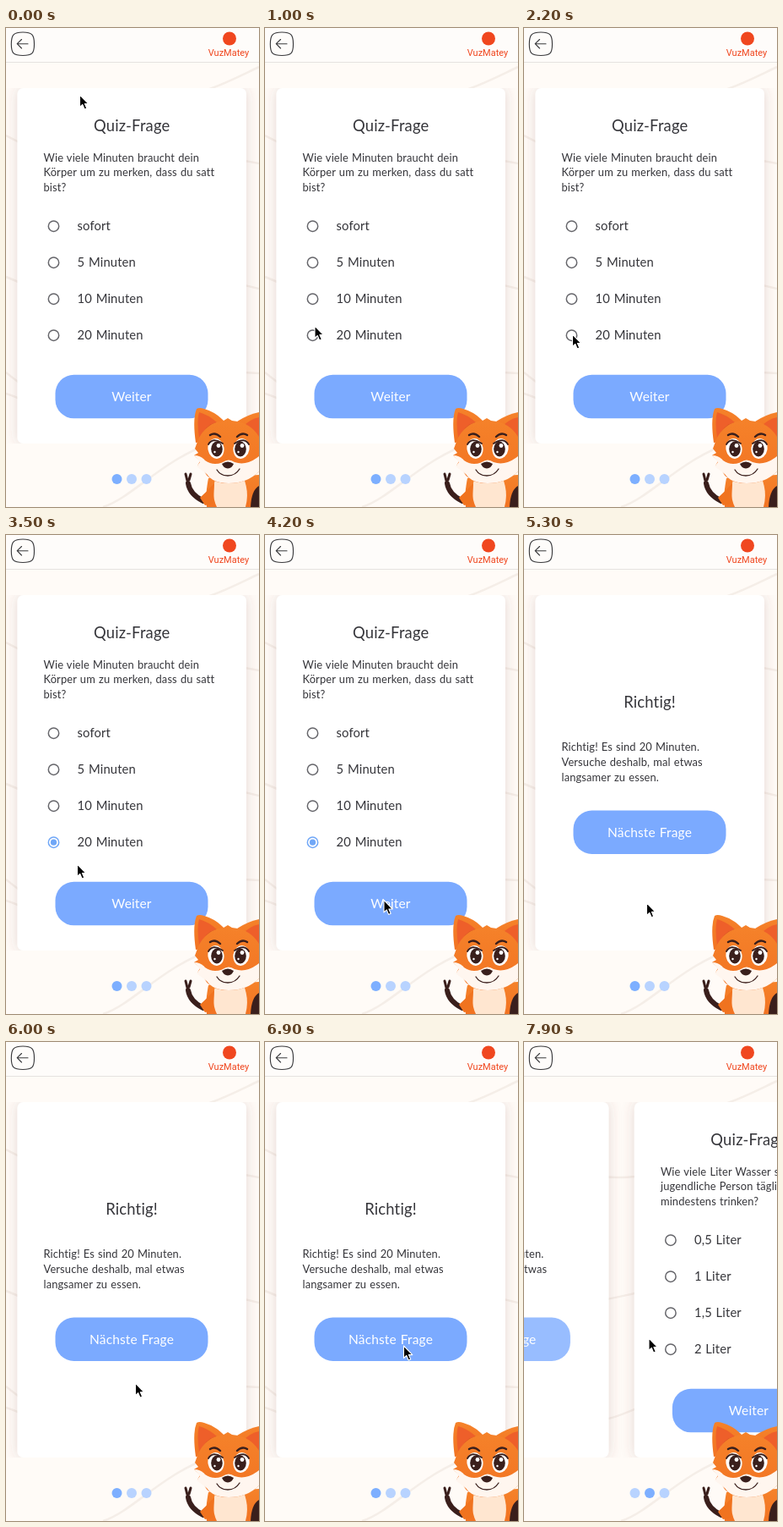
Write an HTML page that moves like this. It is 300 px wide and 566 px high and loops after 8 s.

```html
<!DOCTYPE html>
<html lang="de">
<head>
<meta charset="utf-8">
<title>Quiz</title>
<style>
  html, body { margin: 0; width: 100%; height: 100%; overflow: hidden; background: #fffbf7; }
  svg { display: block; width: 100%; height: 100%; }
  text { font-family: Nunito, Lato, sans-serif; fill: #35353a; letter-spacing: .01em; word-spacing: .05em; }
  .title { font-size: 18.4px; text-anchor: middle; }
  .body { font-size: 12.9px; }
  .option { font-size: 14.8px; }
  .label { font-size: 15.5px; text-anchor: middle; fill: #fff; }
  .brand { font: 11px Roboto, sans-serif; letter-spacing: 0; text-anchor: middle; fill: #f0471f; }
</style>
</head>
<body>
<svg viewBox="0 0 300 566">
  <defs>
    <clipPath id="deckClip"><rect y="71" width="300" height="420"/></clipPath>
    <filter id="shadow" x="-15%" y="-15%" width="130%" height="130%">
      <feDropShadow dx="0" dy="0" stdDeviation="7.5" flood-color="#7a4a48" flood-opacity=".2"/>
    </filter>
    <linearGradient id="fur" x2="0" y2="1">
      <stop stop-color="#f5822a"/><stop offset="1" stop-color="#f27322"/>
    </linearGradient>
  </defs>

  <rect width="300" height="566" fill="#fffbf7"/>
  <g fill="none" stroke="#f5eee8" stroke-width="2.5">
    <path d="M200 84C245 74 270 60 300 46"/>
    <path d="M0 127C35 145 65 160 110 160S230 145 300 160"/>
    <path d="M0 294C50 318 90 306 131 297S240 292 300 308"/>
    <path d="M0 407C35 436 65 452 100 445S180 398 300 408"/>
    <path d="M0 432C25 440 50 455 70 470"/>
    <path d="M115 566C150 555 185 510 245 490"/>
  </g>

  <rect width="300" height="40" fill="#fefcfa"/>
  <path d="M0 40.5H300" stroke="#e5e2e0"/>
  <g fill="none" stroke="#3a3a3d" stroke-width="1.15" stroke-linecap="round" stroke-linejoin="round">
    <path d="M20 5C31 5 33.500 8 33.500 19S31 32.500 20 32.500S6.300 30 6.300 19S9 5 20 5Z"/>
    <path d="M26 18.700H13.500M18.500 13.500L13.200 18.700L18.500 24"/>
  </g>
  <circle cx="265" cy="12.5" r="8" fill="#f0471f"/>
  <text class="brand" x="264" y="33">VuzMatey</text>

  <g clip-path="url(#deckClip)"><g id="deck"></g></g>
  <g id="dots"></g>

  <g id="fox">
    <path d="M240 532Q236 552 238 566H300V528Z" fill="url(#fur)"/>
    <path d="M248 533Q243 552 250 566H284Q289 548 281 530Z" fill="#ffe6d0"/>
    <path d="M216 538Q218 551 234 559" fill="none" stroke="#3a1f1c" stroke-width="6" stroke-linecap="round"/>
    <path d="M215 535L213 527M217 534L219 527" stroke="#3a1f1c" stroke-width="3" stroke-linecap="round"/>
    <path d="M230 555Q238 548 247 538L246 562L236 564Z" fill="#f0731f"/>
    <path d="M300 541Q291 546 290 566H300Z" fill="#3a1f1c"/>
    <path d="M225 490Q221 462 226 450Q229 448 235 450Q249 454 259 465L240 488Z" fill="url(#fur)"/>
    <path d="M229 484Q226 464 229 454Q240 457 250 466Z" fill="#ee5f2a"/>
    <path d="M231 484Q236 469 250 466L241 480Z" fill="#c94a20"/>
    <path d="M274 465Q286 457 300 454V490Z" fill="url(#fur)"/>
    <path d="M284 468Q291 462 300 460V484Z" fill="#ee5f2a"/>
    <path d="M228 486Q238 466 258 464L263 461L268 464Q290 466 300 483V524Q286 538 264 538Q242 538 235 524L227 517L230 512L223 505L228 502L224 497Z" fill="url(#fur)"/>
    <path d="M223 505Q231 505 236 511Q246 518 257 513Q264 508 271 513Q285 518 300 506V524Q286 538 264 538Q245 538 238 527L226 518L230 513Z" fill="#fff6ef"/>
    <g fill="#fff">
      <ellipse cx="249" cy="497" rx="9.500" ry="12" transform="rotate(-10 249 497)"/>
      <ellipse cx="279" cy="497" rx="9.500" ry="12" transform="rotate(10 279 497)"/>
    </g>
    <g fill="#3a1f1c">
      <ellipse cx="250" cy="497.500" rx="6.800" ry="9"/>
      <ellipse cx="278" cy="497.500" rx="6.800" ry="9"/>
      <path d="M256 515Q263 510 270 515Q268 520 263 520.500Q258 520 256 515Z"/>
    </g>
    <g fill="#fff">
      <circle cx="252" cy="493.500" r="2.400"/><circle cx="280" cy="493.500" r="2.400"/>
      <circle cx="247.500" cy="501" r="1.200"/><circle cx="275.500" cy="501" r="1.200"/>
    </g>
    <g fill="none" stroke="#3a1f1c" stroke-linecap="round">
      <path d="M240 492Q245 483 257 491M271 491Q283 483 288 492" stroke-width="1.800"/>
      <path d="M242 481Q248 477 254 483M274 483Q280 477 286 481" stroke-width="2.400"/>
      <path d="M250 522Q254 529 263 529Q272 529 277 521" stroke-width="1.300"/>
    </g>
  </g>

  <path id="cursor" d="M0 0V14.500L3.300 11.500L5.600 17L8.200 15.900L5.900 10.600H10.300Z"
        fill="#000" stroke="#fff" stroke-width="1.100" stroke-linejoin="round"/>
</svg>

<script>
const LOOP = 8000, STEP = 100, STRIDE = 302;
const CLICK = { option: 3000, submit: 4500, reveal: 4900, next: 7600, slide: 7700 };
const SLIDE_TIME = 348;
const BLUE = '#7baaff', PRESSED = '#98bdff', PALE = '#b8d3ff';
const cursorPath = [
  [200, 87.5, 79], [1000, 59, 352], [1300, 57.5, 362], [2900, 57.5, 362],
  [3400, 84.5, 389], [3700, 84.5, 389], [4300, 145.500, 434.8], [5600, 145.500, 434.8],
  [6500, 164.500, 359], [7500, 164.500, 359], [7900, 148, 350]
];
const byId = id => document.getElementById(id);
const smooth = u => { u = Math.min(1, Math.max(0, u)); return u * u * (3 - 2 * u); };

const line = (cls, x, y, text) => `<text class="${cls}" x="${x}" y="${y}">${text}</text>`;
const paragraph = (y, lines) => lines.map((s, i) => line('body', 44.5, y + i * 17.8, s)).join('');
const button = (id, y, label) =>
  `<rect id="${id}" x="58.5" y="${y}" width="181" height="51.5" rx="22" fill="${BLUE}"/>` +
  line('label', 149, y + 31, label);
const radio = (id, y) =>
  `<g id="${id}"><circle cx="56.5" cy="${y}" r="6.2" fill="none" stroke="#66666b" stroke-width="1.5"/></g>`;
const card = content =>
  `<rect x="13.5" y="71" width="271.5" height="420" rx="7" fill="#fff" filter="url(#shadow)"/>${content}`;

function question(id, lines, options) {
  const rows = options.map((s, i) =>
    radio(`${id}Radio${i}`, 234.2 + i * 43) + line('option', 84.5, 239.4 + i * 43, s)).join('');
  return line('title', 149.2, 122, 'Quiz-Frage') + paragraph(157.5, lines) + rows +
    button(`${id}Button`, 409.8, 'Weiter');
}

byId('deck').innerHTML =
  card(
    `<g id="ask">${question('first',
      ['Wie viele Minuten braucht dein', 'Körper um zu merken, dass du satt', 'bist?'],
      ['sofort', '5 Minuten', '10 Minuten', '20 Minuten'])}</g>` +
    `<g id="answer">${line('title', 149, 204, 'Richtig!')}` +
    paragraph(255, ['Richtig! Es sind 20 Minuten.', 'Versuche deshalb, mal etwas', 'langsamer zu essen.']) +
    button('nextButton', 325.5, 'Nächste Frage') + '</g>') +
  `<g transform="translate(${STRIDE} 0)">${card(question('second',
    ['Wie viele Liter Wasser sollte eine', 'jugendliche Person täglich', 'mindestens trinken?'],
    ['0,5 Liter', '1 Liter', '1,5 Liter', '2 Liter']))}</g>`;

byId('firstRadio3').insertAdjacentHTML('beforeend', `<circle id="pick" cx="56.5" cy="363.2" r="3.6" fill="#70a7f7"/>`);
byId('dots').innerHTML = [131.5, 149, 166.5].map(x => `<circle cx="${x}" cy="533" r="6"/>`).join('');

const ring = byId('firstRadio3').firstElementChild;
const show = (el, on) => el.setAttribute('visibility', on ? 'visible' : 'hidden');

function cursorAt(t) {
  const i = cursorPath.findIndex(k => k[0] > t);
  if (i === 0) return cursorPath[0].slice(1);
  if (i < 0) return cursorPath.at(-1).slice(1);
  const [t0, x0, y0] = cursorPath[i - 1], [t1, x1, y1] = cursorPath[i];
  const u = smooth((t - t0) / (t1 - t0));
  return [x0 + (x1 - x0) * u, y0 + (y1 - y0) * u];
}

function draw(t) {
  const picked = t >= CLICK.option, revealed = t >= CLICK.reveal;
  byId('ask').setAttribute('display', revealed ? 'none' : 'inline');
  byId('answer').setAttribute('display', revealed ? 'inline' : 'none');
  show(byId('pick'), picked);
  ring.setAttribute('stroke', picked ? '#70a7f7' : '#66666b');
  byId('firstButton').setAttribute('fill', t >= CLICK.submit ? PRESSED : BLUE);
  byId('nextButton').setAttribute('fill', t >= CLICK.next ? PRESSED : BLUE);

  const shift = STRIDE * smooth((t - CLICK.slide) / SLIDE_TIME);
  byId('deck').setAttribute('transform', `translate(${-shift} 0)`);
  const active = t > CLICK.slide ? 1 : 0;
  [...byId('dots').children].forEach((dot, i) => dot.setAttribute('fill', i === active ? '#7dafff' : PALE));
  byId('cursor').setAttribute('transform', `translate(${cursorAt(t)})`);
}

const start = performance.now();
function tick() {
  const t = (performance.now() - start) % LOOP;
  draw(Math.floor(t / STEP) * STEP);
  requestAnimationFrame(tick);
}
tick();
</script>
</body>
</html>
```
